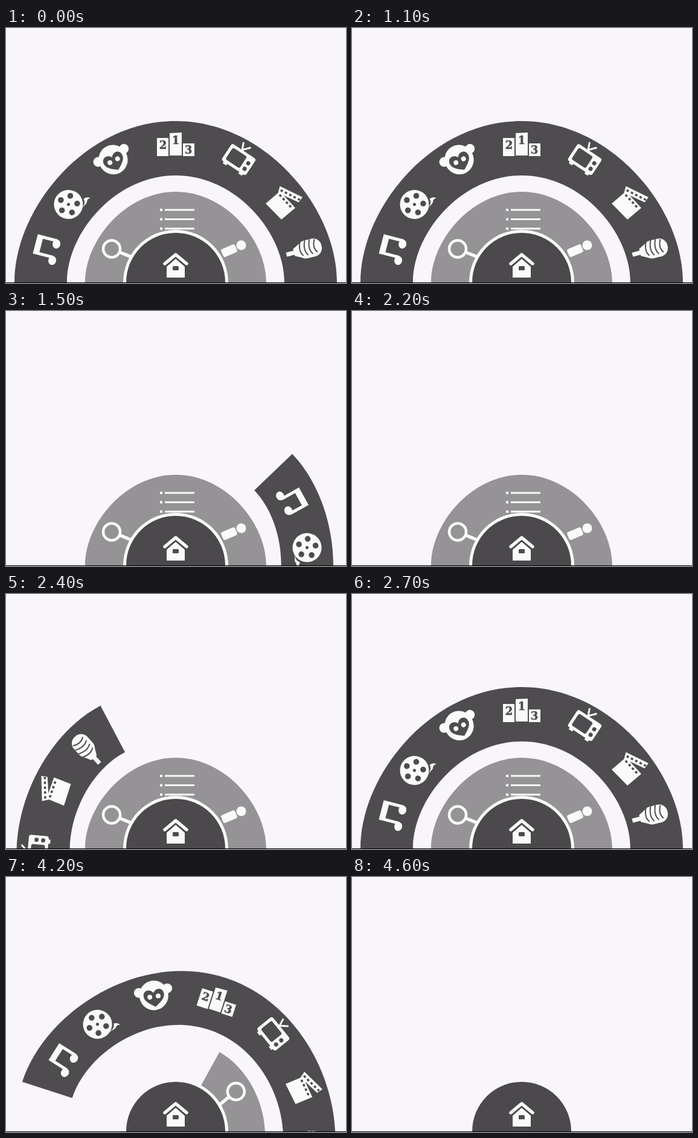
An HTML page for the animation above (4.9 s loop, 563 by 422 pixels).

```html
<!DOCTYPE html>
<html lang="en">
<head>
<meta charset="utf-8">
<title>Radial menu</title>
<style>
  html, body { margin: 0; width: 100%; height: 100%; overflow: hidden; background: #f8f6fa; }
  svg { display: block; width: 100%; height: 100%; }
  .dark { fill: #4e4c4e; }
  .line { fill: none; stroke: #fafafb; }
  .cut { fill: none; stroke: #4e4c4e; }
  text { font: bold 18px "DejaVu Serif", serif; text-anchor: middle; fill: #4e4c4e; stroke: #4e4c4e; stroke-width: .5; }
</style>
</head>
<body>
<svg viewBox="0 0 563 422" fill="#fafafb">
  <!-- everything turns around the bottom centre -->
  <g transform="translate(281 421)">
    <g id="outer">
      <path id="outerBand" class="dark"/>

      <g data-angle="-75.5" data-radius="219">
        <path d="M-13-22H20V12H15V-12H-8V12H-13Z"/>
        <ellipse cx="-16" cy="12" rx="7.5" ry="6.5"/>
        <ellipse cx="12" cy="12" rx="7.5" ry="6.5"/>
      </g>

      <g data-angle="-54" data-radius="219.5">
        <circle r="24"/>
        <path d="M8 22Q20 22 22 15Q28 16 30 23Q25 19 20 23Z"/>
        <g id="reelHoles" class="dark"><circle r="2.5"/></g>
      </g>

      <g data-angle="-27" data-radius="228">
        <circle cx="-24" cy="-8" r="8"/>
        <circle cx="24" cy="-8" r="8"/>
        <ellipse rx="24" ry="24.5"/>
        <path class="dark" d="M0-4C5-13 18-11 17 1C16 9 7 14 0 19C-7 14-16 9-17 1C-18-11-5-13 0-4Z"/>
        <circle cx="-7" cy="2" r="4"/>
        <circle cx="7" cy="2" r="4"/>
      </g>

      <g data-angle="0" data-radius="227">
        <path d="M-31-12H-12V18H-31ZM-10-20L10-21V17H-10ZM12-3H31V18H12Z"/>
        <text x="-21" y="6">2</text>
        <text x="0" y="-2">1</text>
        <text x="21" y="14">3</text>
      </g>

      <g data-angle="27.2" data-radius="229" data-tilt="6">
        <rect x="-24" y="-16" width="48" height="33" rx="4"/>
        <path d="M-19 15h7v5h-7ZM12 15h7v5h-7Z"/>
        <rect class="dark" x="-19" y="-11" width="28" height="23" rx="3"/>
        <circle class="dark" cx="16.5" cy="8" r="3.5"/>
        <circle class="dark" cx="16.5" cy="-3" r="3.5"/>
        <path class="line" stroke-width="3" d="M-9-28L-4-16L6-27"/>
      </g>

      <g data-angle="53.4" data-radius="221.5">
        <path d="M-18-7L19-11L21 19L-16 24ZM-25-12L12-31L15-21L-18-3Z"/>
        <g class="cut" stroke-width="3.5" stroke-dasharray="4 4">
          <path d="M-14-3L18-6.5"/>
          <path d="M-19-9L13-25"/>
        </g>
      </g>

      <g data-angle="75.8" data-radius="220">
        <rect x="-15" y="-29" width="30" height="41" rx="14"/>
        <path d="M-12 6H12L6 18H4V31H-3V18H-6Z"/>
        <path class="cut" stroke-width="2" d="M-13-20Q0-13 9-20M-15-12Q0-5 10-12M-15-4Q0 3 10-4M-15 4Q0 11 9 4"/>
      </g>
    </g>

    <g id="middle">
      <path id="middleBand" fill="#959395"/>
      <path d="M-87 0A87 87 0 0 1 87 0Z"/>
      <g class="line">
        <path stroke-width="3" d="M-18-120H31M-18-104.5H31M-18-89H31"/>
        <path stroke-width="4" d="M-26-120h4M-26-104.5h4M-26-89h4"/>
        <circle cx="-106" cy="-55.5" r="14" stroke-width="4.5"/>
        <path stroke-width="5.5" d="M-93-50L-73-42"/>
      </g>
      <rect x="-12.5" y="-7" width="25" height="14" rx="3" transform="translate(88.5 -52.5) rotate(-23)"/>
      <circle cx="108.5" cy="-61.5" r="8"/>
    </g>

    <g>
      <circle r="82" fill="#4b494b"/>
      <path class="line" stroke-width="5.5" stroke-linejoin="round" stroke-linecap="round" d="M-18-31L0-46L18-31"/>
      <path d="M0-39L15-26V-8H-15V-26Z"/>
      <rect class="dark" x="-5" y="-27" width="10" height="7" rx="1.5"/>
    </g>
  </g>
  <rect y="421" width="563" height="1" fill="#000"/>
</svg>

<script>
const byId = id => document.getElementById(id);

// Slightly flattened half circle; a negative rx runs it from right to left.
function arch(rx, ry) {
  const side = 0.46, top = 0.56;
  return `${-rx} 0C${-rx} ${-ry * side} ${-rx * top} ${-ry} 0 ${-ry}` +
         `C${rx * top} ${-ry} ${rx} ${-ry * side} ${rx} 0`;
}
byId("outerBand").setAttribute("d", `M${arch(267, 267)}L${arch(-180, 177)}Z`);
byId("middleBand").setAttribute("d", `M${arch(150, 150)}L${arch(-86, 86)}Z`);

for (const icon of document.querySelectorAll("[data-angle]")) {
  const { angle, radius, tilt = 0 } = icon.dataset;
  icon.setAttribute("transform", `rotate(${angle}) translate(0 ${-radius}) rotate(${tilt})`);
}

for (let i = 0; i < 5; i++) {
  const hole = document.createElementNS("http://www.w3.org/2000/svg", "circle");
  hole.setAttribute("r", 4.8);
  hole.setAttribute("cy", -14.5);
  hole.setAttribute("transform", `rotate(${i * 72 - 6})`);
  byId("reelHoles").append(hole);
}

const LOOP = 4900, STEP = 100, TURN = 500;

// Half a turn with a cosine ease in and out.
function halfTurn(time, start) {
  const x = Math.min(1, Math.max(0, (time - start) / TURN));
  return 90 * (1 - Math.cos(Math.PI * x));
}

function render(now) {
  const time = Math.floor((now % LOOP) / STEP) * STEP;
  const outer = halfTurn(time, 1164) + halfTurn(time, 2200) + halfTurn(time, 4098);
  byId("outer").setAttribute("transform", `rotate(${outer})`);
  byId("middle").setAttribute("transform", `rotate(${halfTurn(time, 3898)})`);
}

const startTime = performance.now();
function tick() {
  render(performance.now() - startTime);
  requestAnimationFrame(tick);
}
tick();
</script>
</body>
</html>
```
